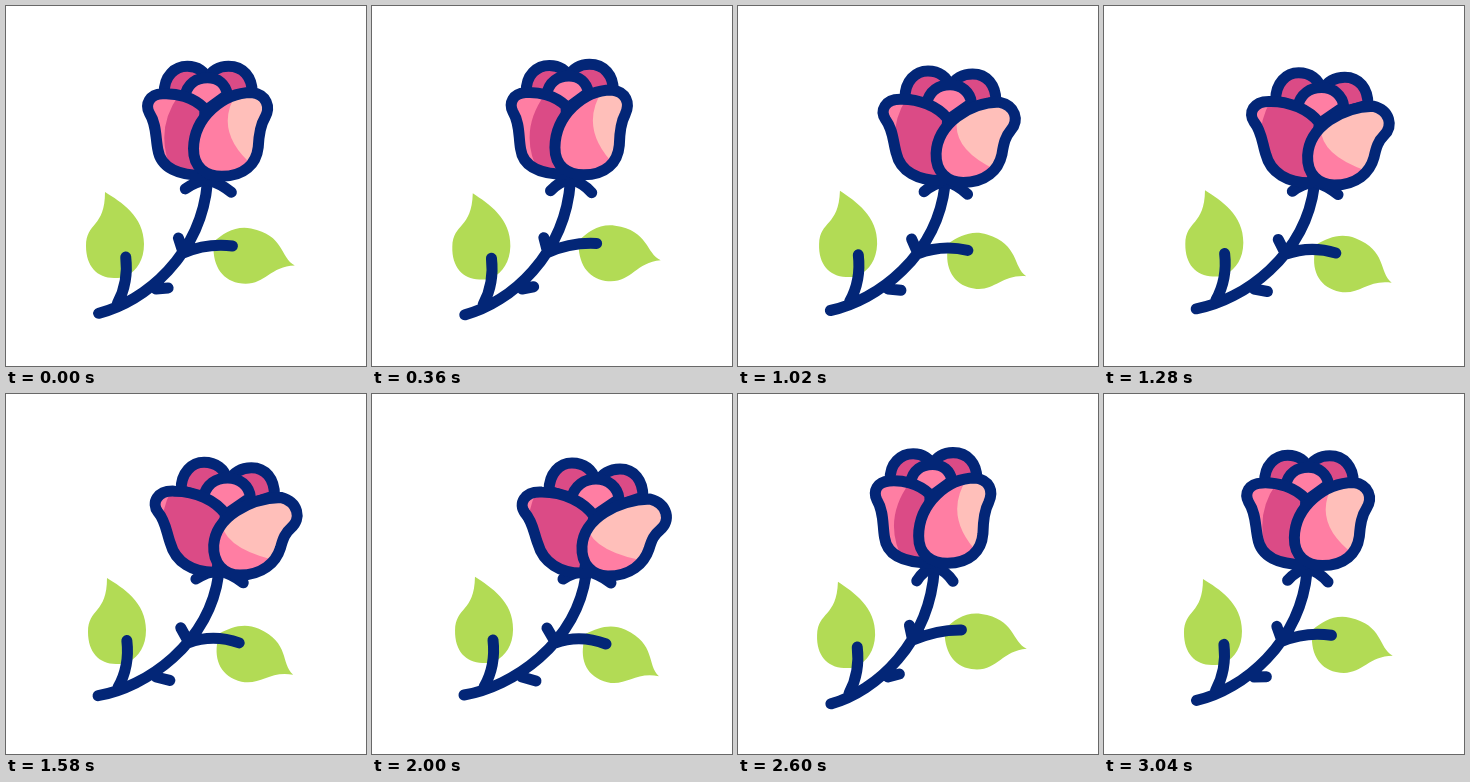
An HTML page that plays this animation: 360 px wide and 360 px high, repeating every 3060 ms.

```html
<!DOCTYPE html>
<html lang="en">
<head>
<meta charset="utf-8">
<title>Rose</title>
<style>
  html, body { margin: 0; width: 100%; height: 100%; overflow: hidden; background: #fff; }
  svg { display: block; width: 100vw; height: 100vh; }
  .line { fill: none; stroke: #032677; stroke-width: 11; stroke-linecap: round; stroke-linejoin: round; }
  .leaf { fill: #b2db55; }
  .dark { fill: #db4b86; }
  .pink { fill: #ff7ea3; }
  .pale { fill: #ffbfba; }
  .edged { stroke: #032677; stroke-width: 11; stroke-linejoin: round; }
</style>
</head>
<body>
<svg viewBox="0 0 360 360">
  <defs>
    <clipPath id="clipLeft"><path data-shape="left"/></clipPath>
    <clipPath id="clipRight"><path data-shape="right"/></clipPath>
  </defs>
  <path id="leafLeft" class="leaf" d="M-10-56C6-46 29-32 29-4C29 12 22 22 12 28C8 30 4 30 -1 30C-18 30 -29 18 -29-2C-29-26 -10-20 -10-56Z"/>
  <path id="leafRight" class="leaf" d="M54 0C38-5 38-28 4-28C-12-28 -22-18 -30-8C-28 14 -16 28 2 28C28 28 28 6 54 0Z"/>
  <path class="line" data-shape="stem"/>
  <path class="line" data-shape="sepals" id="sepals"/>
  <g id="bud">
    <path class="dark edged" data-shape="backLeft"/>
    <path class="dark edged" data-shape="backRight"/>
    <path class="pink edged" data-shape="middle"/>
    <path class="dark" data-shape="left"/>
    <g clip-path="url(#clipLeft)"><path class="pink" data-shape="glowLeft"/></g>
    <path class="line" data-shape="left"/>
    <path class="pink" data-shape="right"/>
    <g clip-path="url(#clipRight)"><path class="pale" data-shape="glowRight"/></g>
    <path class="line" data-shape="right"/>
  </g>
</svg>
<script>
const LOOP = 3060;
const TIMES = [0, 540, 660, 720, 1020, 1580, 1820, 2000, 2160, 2600, 2720, 3060];

// 0 is the closed flower, 1 the open one
const TRACKS = {
  bloom: [.24, .04, 0, -.02, .62, .93, 1.02, 1, .93, .1, -.02, .33],
  sway: [.37, .1, 0, -.08, .65, .93, 1, 1, .93, .12, -.12, .46],
  sepal: [.85, .2, 0, -.05, .65, .95, 1.02, 1, .9, .1, 0, .42],
  droop: [.44, .2, 0, -.06, .7, .96, 1, 1, .95, .33, .1, .5],
  leafX: [0, .5, 1, 1, 1, 2, 3, 3, 2, -1, -2, 0],
  leafY: [0, 2, 2, 2, -1, -2, -3, -3, -2.5, 2, 2.5, -1],
  leafTurn: [0, 3, 5, 4.5, 2, 0, 0, 1, 1.5, 2, 1, 0]
};

// Each shape: [track, closed path, open path]
const SHAPES = {
  backLeft: ['bloom',
    'M149 86C148 68 160 59 172 59C182 59 189 64 191 71L180 90Z',
    'M177 97C177 79 188 69 200 69C212 69 221 76 223 86L208 108Z'],
  backRight: ['bloom',
    'M190 70C194 61 202 57 211 57C226 57 235 68 235 83L206 90Z',
    'M226 88C229 80 238 75 248 75C262 75 271 86 271 103L244 112Z'],
  middle: ['bloom',
    'M169 88C171 74 181 69 191 69C201 69 208 75 210 85L190 100Z',
    'M199 106C202 91 213 85 224 85C236 85 246 93 247 105L222 122Z'],
  left: ['bloom',
    'M188 98C176 87 160 85 149 86C137 87 133 96 137 105C144 117 142 130 144 143C146 161 164 168 192 168Z',
    'M222 122C212 108 192 98 170 98C152 97 146 110 153 119C161 128 162 140 166 150C171 168 188 180 212 179Z'],
  right: ['bloom',
    'M232 82C205 82 177 108 177 141C177 160 190 168 206 168C228 168 240 156 241 138C241 124 242 114 246 106C251 94 246 83 232 82Z',
    'M278 105C246 106 212 124 210 152C209 170 220 182 236 182C258 182 272 170 277 155C280 145 282 141 288 136C299 127 296 110 278 105Z'],
  glowLeft: ['shade',
    'M172 88Q141 130 168 170L120 180L120 75Z',
    'M167 94Q151 118 157 165L130 170L130 90Z'],
  glowRight: ['bloom',
    'M232 78Q202 118 238 160L270 160L270 70L232 60Z',
    'M214 122Q211 154 268 166L320 166L310 80L214 80Z'],
  sepals: ['sepal',
    'M0 -4Q-11 0 -17 11M0 -4Q11 0 18 11',
    'M0 -4Q-12 -3 -23 4M0 -4Q13 -1 25 8'],
  stem: ['sway',
    'M93 311C138 298 190 248 194 174M119 254Q122 279 111 300M171 231L173 243M161 279L150 283M222 234Q197 235 173 246',
    'M92 301C140 293 204 250 214 181M121 246Q124 272 112 293M175 234L182 246M164 287L150 283M234 250Q208 240 183 249']
};

const NUMBER = /-?\d+/g;
const byId = id => document.getElementById(id);
const place = (id, x, y, turn = 0) =>
  byId(id).setAttribute('transform', `translate(${x} ${y}) rotate(${turn})`);

function mix(a, b, t) {
  const ends = b.match(NUMBER);
  let i = 0;
  return a.replace(NUMBER, n => (+n + (ends[i++] - n) * t).toFixed(2));
}

const slope = (v, i) => (v[i + 1] - v[i]) / (TIMES[i + 1] - TIMES[i]);

// Tangent that never overshoots the keys
function tangent(v, i) {
  if (i === 0 || i === v.length - 1) return 0;
  const a = slope(v, i - 1), b = slope(v, i);
  return a * b <= 0 ? 0 : 2 * a * b / (a + b);
}

function sample(v, t) {
  let i = 0;
  while (i < TIMES.length - 2 && t >= TIMES[i + 1]) i++;
  const d = TIMES[i + 1] - TIMES[i], u = (t - TIMES[i]) / d;
  const w = u * u * (3 - 2 * u);
  return v[i] + (v[i + 1] - v[i]) * w
    + d * u * (1 - u) * ((1 - u) * tangent(v, i) - u * tangent(v, i + 1));
}

function draw(t) {
  const p = {};
  for (const name in TRACKS) p[name] = sample(TRACKS[name], t);
  p.shade = Math.max(0, p.bloom) ** .7;

  for (const el of document.querySelectorAll('[data-shape]')) {
    const [track, closed, open] = SHAPES[el.dataset.shape];
    el.setAttribute('d', mix(closed, open, p[track]));
  }
  const lag = p.sway - p.bloom;
  place('bud', 20 * lag, -8 * lag);
  place('sepals', 194 + 20 * p.sway, 176 + 5 * p.sway);
  place('leafLeft', 109 + p.leafX, 242 + p.leafY, p.leafTurn);
  place('leafRight', 234 + 4 * p.droop, 241 + 18.5 * p.droop, 25 * p.droop);
}

const start = performance.now();
function frame() {
  draw((performance.now() - start) % LOOP);
  requestAnimationFrame(frame);
}
frame();
</script>
</body>
</html>
```
